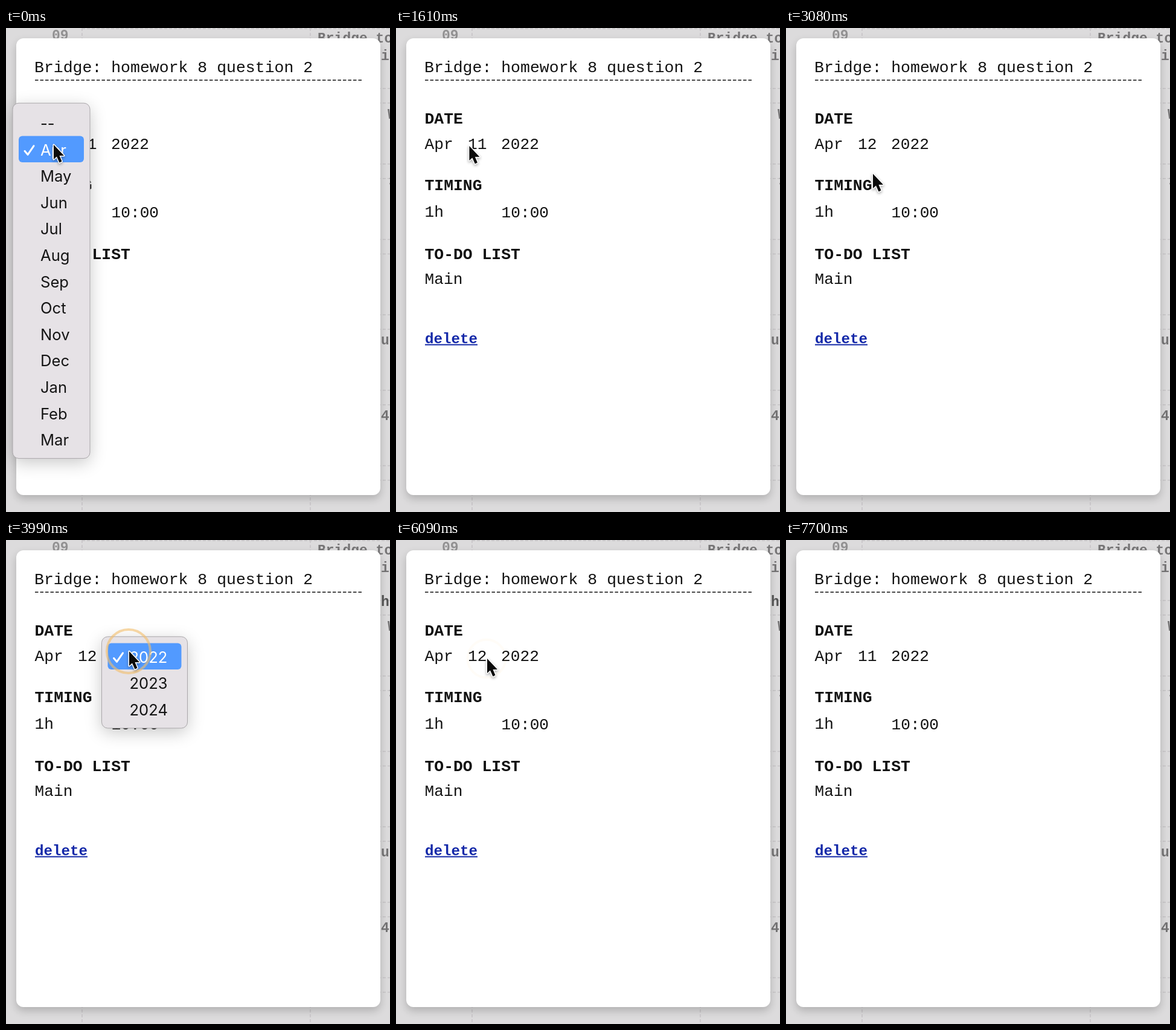
An HTML page with a canvas that plays this animation: 636 px wide and 800 px high, repeating every 8.05 s.

```html
<!DOCTYPE html>
<html lang="en">
<head>
<meta charset="utf-8">
<title>Date picker</title>
<style>
  html, body { margin: 0; width: 100%; height: 100%; overflow: hidden; background: #dcdbdc; }
  canvas { display: block; }
</style>
</head>
<body>
<canvas id="stage" width="636" height="800"></canvas>
<script>
const ctx = document.getElementById('stage').getContext('2d');
const LOOP = 8050, ROW = 43.6, MOVE = 350, FADE = 170, RING = 450;
const MONO = '"Liberation Mono", "Courier New", monospace';
const SANS = 'Inter, Roboto, sans-serif';

const months = '-- Apr May Jun Jul Aug Sep Oct Nov Dec Jan Feb Mar'.split(' ');
const days = ['--', ...Array.from({ length: 31 }, (_, i) => String(i + 1))];
const years = ['2022', '2023', '2024'];

// Each visit: the pointer opens a menu at `from`, hovers at `to`, then picks there or back at `from`.
const visits = [
  { items: months, checked: 1, x: 11, w: 128, open: -300, close: 1400, from: [78, 191], to: [85, 230] },
  { items: days, checked: 11, x: 83, w: 111, open: 2000, close: 2850, from: [143, 194], to: [143, 239], keep: true },
  { items: years, checked: 0, x: 158.5, w: 142, open: 3960, close: 5180, from: [203, 182], to: [220, 221] },
  { items: days, checked: 12, x: 83, w: 111, open: 6200, close: 6950, from: [150, 194], to: [148, 154], keep: true },
];
const [, laterDay, , earlierDay] = visits;

const stops = visits.flatMap(({ open, close, from, to, keep }) => [
  { start: open - 600, at: from },
  { start: open + 350, at: to },
  { start: close - 400, at: keep ? to : from },
]);
stops.push({ start: earlierDay.close + 120, at: [650, 760] });

const clicks = visits.flatMap(({ open, close }) => [open - 150, close - 250]);

const clamp = u => Math.max(0, Math.min(1, u));
const ease = u => u * u * (3 - 2 * u);

function pointerAt(t) {
  let [x, y] = visits[0].from;
  for (const { start, at } of stops) {
    const k = ease(clamp((t - start) / MOVE));
    x += (at[0] - x) * k;
    y += (at[1] - y) * k;
  }
  return { x, y };
}

function text(str, x, y, { size = 26.2, bold = false, color = '#111', font = MONO } = {}) {
  ctx.font = `${bold ? 'bold ' : ''}${size}px ${font}`;
  ctx.fillStyle = color;
  ctx.fillText(str, x, y);
}

function line(x0, y0, x1, y1, color, width, dash = []) {
  ctx.beginPath();
  ctx.moveTo(x0, y0);
  ctx.lineTo(x1, y1);
  ctx.strokeStyle = color;
  ctx.lineWidth = width;
  ctx.setLineDash(dash);
  ctx.stroke();
  ctx.setLineDash([]);
}

function box(x, y, w, h, r, color) {
  ctx.beginPath();
  ctx.roundRect(x, y, w, h, r);
  ctx.fillStyle = color;
  ctx.fill();
}

function shadow(color, blur, dy) {
  ctx.shadowColor = color;
  ctx.shadowBlur = blur;
  ctx.shadowOffsetY = dy;
}

const noShadow = () => shadow('transparent', 0, 0);

function drawBackdrop(moved) {
  ctx.fillStyle = '#dcdbdc';
  ctx.fillRect(0, 0, 636, 800);
  const rule = (...ends) => line(...ends, '#c6c4c6', 1.5, [5, 3]);
  rule(126, 0, 126, 800);
  rule(504, 0, 504, 800);
  rule(126, 1, 636, 1);
  // two columns of events, each block closed by a short gap
  for (let y = 124; y < 800; y += 124.7) {
    rule(504, y - 24, 636, y - 24);
    rule(504, y, 636, y);
  }
  const label = (str, x, y, color = '#767576') => text(str, x, y, { size: 23, bold: true, color });
  label('09', 76, 19, '#929192');
  label('Bridge to', 516, 24);
  label('ic', 621, 53);
  label('W', 632, 150);
  label('3', 634, 261);
  label('ue', 621, 523);
  label('4', 621, 648);
  if (moved) label('h', 621, 109, '#555');
}

function drawCard(day) {
  shadow('rgba(0,0,0,.2)', 14, 6);
  box(17, 17, 603, 755, 12, '#fff');
  noShadow();
  text('Bridge: homework 8 question 2', 47, 73, { size: 26.5 });
  line(48, 86.3, 590, 86.3, '#111', 1.6, [5.5, 3]);

  const section = (heading, y) => text(heading, 47.5, y, { bold: true, size: 26.4 });
  section('DATE', 158);
  text('Apr', 47.5, 199.5);
  text(day, 119, 199.5);
  text('2022', 174, 199.5);
  section('TIMING', 268);
  text('1h', 47.5, 311.5);
  text('10:00', 174.5, 313);
  section('TO-DO LIST', 382);
  text('Main', 47.5, 423);

  text('delete', 48, 521, { size: 24.2, bold: true, color: '#1328a8' });
  line(48, 523.5, 135, 523.5, '#1328a8', 2);
}

function drawTick(x, y, color) {
  ctx.beginPath();
  ctx.moveTo(x, y + 2);
  ctx.lineTo(x + 5, y + 8);
  ctx.lineTo(x + 15, y - 6.5);
  ctx.strokeStyle = color;
  ctx.lineWidth = 3;
  ctx.lineCap = ctx.lineJoin = 'round';
  ctx.stroke();
  ctx.lineCap = 'butt';
}

function drawMenu({ open, close, x, w, items, checked }, t) {
  if (t < open || t > close + FADE) return;
  // the checked row opens over its field
  const y = items === years ? 193.3 : 201.3;
  const centre = i => y + (i - checked) * ROW;
  const top = centre(0) - 33.5, bottom = centre(items.length - 1) + 30.5;
  const active = checked + Math.round((pointerAt(Math.min(t, close)).y - y) / ROW);

  ctx.globalAlpha = 1 - clamp((t - close) / FADE);
  shadow('rgba(0,0,0,.22)', 28, 7);
  box(x, top, w, bottom - top, 10, '#e6e2e6');
  noShadow();
  ctx.strokeStyle = '#aaa7aa';
  ctx.lineWidth = 1;
  ctx.stroke();

  items.forEach((item, i) => {
    const cy = centre(i), color = i === active ? '#fff' : '#151515';
    if (i === active) box(x + 10, cy - 22.8, w - 20, ROW, 6, '#529aff');
    text(item, x + 46, cy + 9.3, { size: 25.6, color, font: SANS });
    if (i === checked) drawTick(x + 20, cy, color);
  });
  ctx.globalAlpha = 1;
}

function drawRing(start, t, { x, y }) {
  const u = (t - start) / RING;
  if (u <= 0 || u >= 1) return;
  ctx.beginPath();
  ctx.arc(x, y + 2, 30 + 15 * u, 0, Math.PI * 2);
  ctx.strokeStyle = `rgba(244,190,105,${0.65 * Math.sin(Math.PI * u) ** 2})`;
  ctx.lineWidth = 4;
  ctx.stroke();
}

const arrow = new Path2D('M0 0V24L5 19.5L9.5 29.5L13.5 27.5L9.5 18H17Z');

function drawPointer({ x, y }) {
  ctx.save();
  ctx.translate(x + 1, y + 2);
  ctx.lineJoin = 'round';
  ctx.lineWidth = 3;
  ctx.strokeStyle = '#fff';
  shadow('rgba(0,0,0,.35)', 4, 2);
  ctx.stroke(arrow);
  noShadow();
  ctx.fillStyle = '#0b0b0b';
  ctx.fill(arrow);
  ctx.restore();
}

function draw(t) {
  const pointer = pointerAt(t);
  const picked = t >= laterDay.close && t < earlierDay.close;
  drawBackdrop(picked && t > 3780);
  drawCard(picked ? '12' : '11');
  visits.forEach(visit => drawMenu(visit, t));
  clicks.forEach(start => drawRing(start, t, pointer));
  drawPointer(pointer);
}

const began = performance.now();
function frame() {
  draw((performance.now() - began) % LOOP);
  requestAnimationFrame(frame);
}
frame();
</script>
</body>
</html>
```
